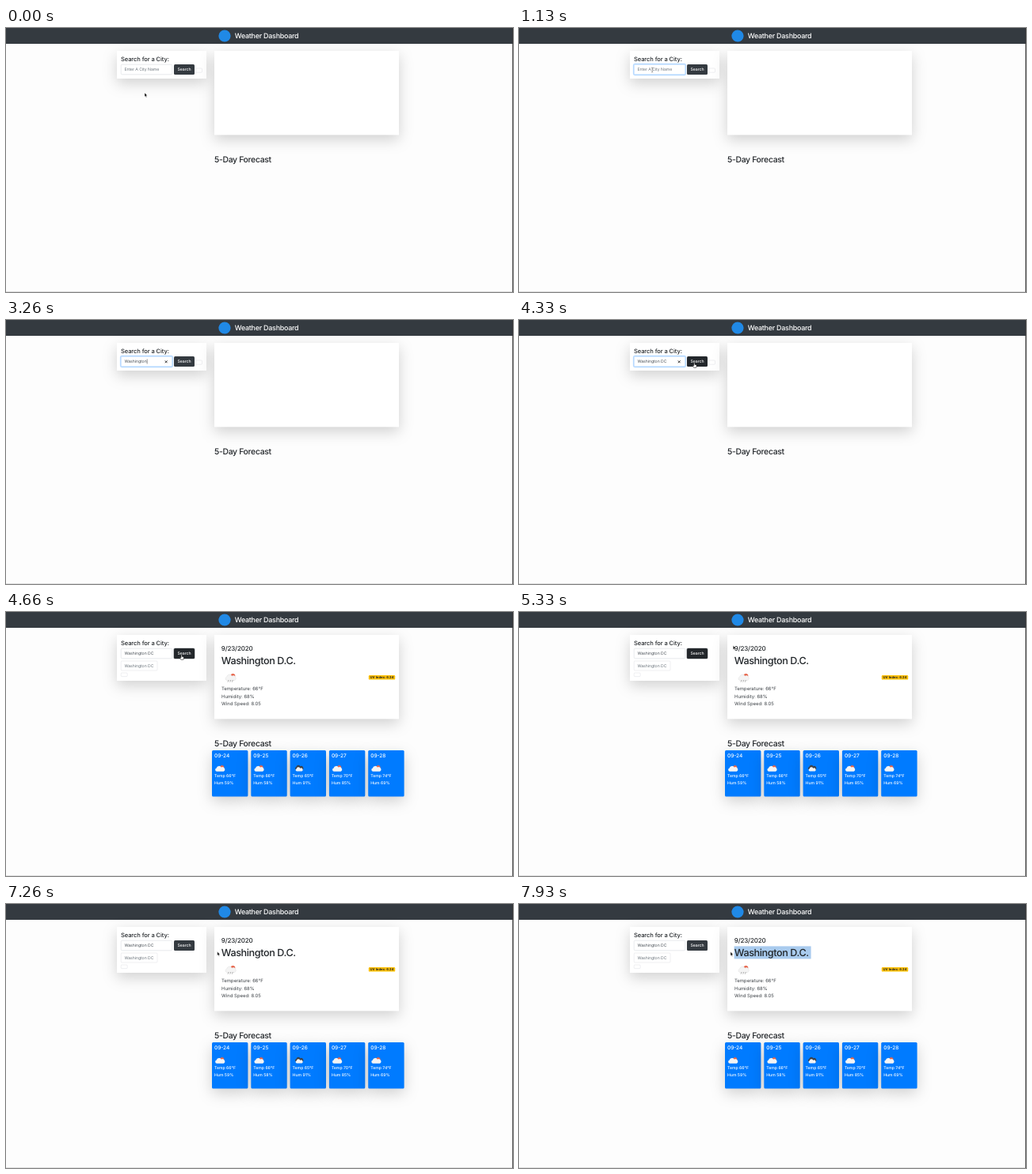
An HTML page that plays this animation: 640 by 334 pixels, repeating every 8 s.

```html
<!DOCTYPE html>
<html lang="en">
<head>
<meta charset="utf-8">
<title>Weather Dashboard</title>
<style>
  html, body { margin: 0; width: 100%; height: 100%; overflow: hidden; background: #fdfdfd; }
  svg { display: block; width: 640px; height: 334px; }
  text { font-family: Inter, "Open Sans", sans-serif; text-rendering: geometricPrecision; white-space: pre; }
  .shadow { filter: drop-shadow(0 6px 9px rgba(0, 0, 0, .175)); }
</style>
</head>
<body>
<svg id="stage" viewBox="0 0 640 334"></svg>
<script>
const LOOP = 8000, FPS = 15;
const INK = '#212529', DARK = '#343a40', BLUE = '#007bff', LINE = '#ced4da';
const stage = document.getElementById('stage');

function add(parent, tag, attrs = {}) {
  const el = document.createElementNS('http://www.w3.org/2000/svg', tag);
  for (const key in attrs) el.setAttribute(key, attrs[key]);
  parent.appendChild(el);
  return el;
}
const group = (parent, attrs) => add(parent, 'g', attrs);
const box = (parent, x, y, width, height, fill, more) =>
  add(parent, 'rect', { x, y, width, height, fill, ...more });
const disc = (parent, cx, cy, r, fill) => add(parent, 'circle', { cx, cy, r, fill });

// Text centred on its capitals at cy; track is letter spacing in em.
function label(parent, str, x, cy, size, { fill = INK, weight = 400, track = 0, anchor = 'start' } = {}) {
  const el = add(parent, 'text', {
    x, y: cy + size * 0.364, fill, 'font-size': size, 'font-weight': weight,
    'letter-spacing': track * size, 'text-anchor': anchor
  });
  el.textContent = str;
  return el;
}
const show = (el, on) => { el.style.visibility = on ? 'visible' : 'hidden'; };

const CLOUD = 'M-4 3.4a2.2 2.2 0 0 1-.4-4.3A3.2 3.2 0 0 1 1.6-1.8A2.7 2.7 0 0 1 4.6 3.4z';
function weatherIcon(parent, x, y, { scale = 1, night = false, rain = false } = {}) {
  const g = group(parent, { transform: `translate(${x} ${y}) scale(${scale})` });
  if (night) add(g, 'path', { d: CLOUD, fill: '#3c4149', transform: 'translate(1 -1.2) scale(.85)' });
  else disc(g, 2.2, -1.5, 2.6, '#e8664b');
  add(g, 'path', {
    d: CLOUD, fill: '#f4f4f4', transform: night ? 'translate(1 1) scale(.75)' : 'translate(-.4 .4)',
    stroke: rain ? '#d5d5d5' : 'none', 'stroke-width': .3
  });
  if (rain) add(g, 'path', { d: 'M-2.6 3.2l-1 2.4M-.2 3.2l-1 2.4M2.2 3.2l-1 2.4', stroke: '#777', 'stroke-width': .5 });
}

// Page frame
box(stage, 0, 0, 640, 334, '#fdfdfd');
box(stage, 0, 333, 640, 1, '#e2e2e2');
box(stage, 0, 0, 640, 20, DARK);
box(stage, 639.2, 0, .8, 334, '#333');
disc(stage, 276, 10, 7.6, '#2089e6');
label(stage, 'Weather Dashboard', 288.7, 9.5, 8.9, { fill: '#fff', weight: 500, track: -.025 });

// Search panel
const panel = box(stage, 140, 29, 113, 35, '#fff', { class: 'shadow' });
label(stage, 'Search for a City:', 145, 39.2, 7.5, { weight: 500, track: -.01 });
const ring = box(stage, 144.4, 45.4, 66.2, 14.2, 'none', { rx: 2, stroke: '#bfdeff', 'stroke-width': 1.1 });
const field = box(stage, 145.2, 46.2, 64.6, 12.6, '#fff', { rx: 1.5, 'stroke-width': .5 });
const small = { track: -.01 };
const hint = label(stage, 'Enter A City Name', 149.5, 52.5, 5.15, { ...small, fill: '#6c757d' });
const typed = label(stage, '', 149.5, 52.5, 5.15, { ...small, fill: '#495057' });
const caret = box(stage, 0, 49.4, .5, 6.2, '#333');
const clear = add(stage, 'path', { d: 'M200.8 51.4l2.8 2.8m0-2.8l-2.8 2.8', stroke: '#222', 'stroke-width': .9 });
const halo = box(stage, 211.4, 45.4, 27.2, 14.2, '#a6a9ac', { rx: 2.2 });
const button = box(stage, 212, 46, 26, 13, DARK, { rx: 1.5 });
label(stage, 'Search', 225, 52.5, 5.15, { fill: '#fff', weight: 500, track: -.01, anchor: 'middle' });

const outline = { rx: 1, stroke: '#dcdfe2', 'stroke-width': .5 };
const emptyItem = box(stage, 239.5, 51, 8, 5.2, '#fff', outline);
const history = group(stage);
box(history, 145.2, 62, 45.8, 12, '#fff', outline);
label(history, 'Washington DC', 149.5, 68, 5.15, { ...small, fill: '#6c757d' });

// Current weather and forecast
box(stage, 263, 29, 233, 106.3, '#fff', { class: 'shadow' });
label(stage, '5-Day Forecast', 263, 166.5, 10.4, { weight: 500, track: -.03 });

const results = group(stage);
const marks = [[271.6, 41, 40.4, 9], [271.6, 53.4, 68, 16], [271.6, 53.4, 97, 16]]
  .map(([x, y, w, h]) => box(results, x, y, w, h, '#a9cbee'));
label(results, '9/23/2020', 271.8, 46, 8, { weight: 500, track: -.02 });
label(results, 'Washington D.C.', 271.8, 61.7, 12.6, { weight: 500, track: -.03 });
weatherIcon(results, 284, 82.5, { scale: 1.1, rain: true });
['Temperature: 66°F', 'Humidity: 68%', 'Wind Speed: 8.05'].forEach((line, i) =>
  label(results, line, 272, 97.2 + i * 9.4, 5.95, { fill: '#3a3f44' }));
box(results, 457.8, 80, 33.4, 5.6, '#ffc107', { rx: 1.2 });
label(results, 'UV Index: 6.24', 474.5, 82.8, 4.15, { weight: 700, anchor: 'middle' });

[['09-24', 66, 59], ['09-25', 66, 58], ['09-26', 65, 91], ['09-27', 70, 85], ['09-28', 74, 69]]
  .forEach(([day, temp, hum], i) => {
    const x = 260 + i * 49.3, white = { fill: '#fff', weight: 500 };
    box(results, x, 175, 45.4, 58.6, BLUE, { rx: 1.5, class: 'shadow' });
    label(results, day, x + 3, 182, 6.5, white);
    weatherIcon(results, x + 10.5, 198, { night: i === 2 });
    label(results, `Temp ${temp}°F`, x + 3, 207.2, 5.15, white);
    label(results, `Hum ${hum}%`, x + 3, 216.3, 5.15, white);
  });

// Pointers, each with its hot spot at 0,0
const pointers = {
  arrow: add(stage, 'path', {
    d: 'M0 0V4.9L1.1 3.9L1.9 5.7L2.7 5.3L1.9 3.6H3.4z',
    fill: '#000', stroke: '#fff', 'stroke-width': .4
  }),
  beam: add(stage, 'path', {
    d: 'M-1-3Q0-3 0-2.4Q0-3 1-3M0-2.4V2.4M-1 3Q0 3 0 2.4Q0 3 1 3',
    fill: 'none', stroke: '#444', 'stroke-width': .5
  }),
  hand: add(stage, 'path', {
    d: 'M-.6 0Q0-.7.6 0V2L2.6 2.6Q3.1 2.8 2.9 3.8L2.4 6H-.7L-2.1 3.7Q-1.8 2.9-.6 3.7z',
    fill: '#fff', stroke: '#000', 'stroke-width': .5
  })
};

// Time, x, y of the pointer
const PATH = [
  [0, 175, 82], [200, 176, 78], [800, 168, 53], [3930, 174, 53], [4060, 178, 53], [4130, 178, 53],
  [4330, 221.3, 54.3], [5000, 222, 54.3], [5270, 270.3, 42.5], [6600, 270.3, 42.5],
  [6930, 259, 54], [7230, 267, 60.5], [LOOP, 267, 60.5]
];
const WORD = 'Washington DC';
const KEYS = [1330, 1730, 1870, 2070, 2200, 2330, 2600, 2800, 3000, 3200, 3400, 3600, 3800];

function pointerAt(t) {
  const i = PATH.findIndex((p, n) => n && t <= p[0]);
  const [t0, x0, y0] = PATH[i - 1], [t1, x1, y1] = PATH[i];
  const u = (t - t0) / (t1 - t0), k = u * u * (3 - 2 * u);
  return [x0 + (x1 - x0) * k, y0 + (y1 - y0) * k];
}

function draw(now) {
  const t = Math.floor((now + 4) * FPS / 1000) * 1000 / FPS + 1;
  const within = (a, b) => t >= a && t < b;

  const focused = within(800, 4460), loaded = t >= 4600;
  const count = KEYS.filter(k => t >= k).length;
  show(ring, focused);
  field.setAttribute('stroke', focused ? '#80bdff' : LINE);
  typed.textContent = WORD.slice(0, count);
  show(hint, !count);
  show(clear, count && t < 4600);
  show(caret, focused && t < 4000 && (count ? true : t % 1060 > 500));
  caret.setAttribute('x', 149.7 + (count ? typed.getComputedTextLength() : 0));

  const pressed = within(4460, 5660);
  show(halo, pressed);
  button.setAttribute('fill', pressed || within(4260, 5130) ? '#23272b' : DARK);

  panel.setAttribute('height', loaded ? 58 : 35);
  emptyItem.setAttribute('x', loaded ? 145.2 : 239.5);
  emptyItem.setAttribute('y', loaded ? 77 : 51);
  emptyItem.setAttribute('height', loaded ? 4.6 : 5.2);
  show(history, loaded);
  results.style.display = loaded ? '' : 'none';
  show(marks[0], within(5860, 6660));
  show(marks[1], within(7660, 7790));
  show(marks[2], t >= 7790);

  const [x, y] = pointerAt(t);
  const inField = x > 145 && x < 210 && y > 46 && y < 59;
  const kind = inField ? 'beam' : within(4200, 5130) ? 'hand' : 'arrow';
  for (const name in pointers) {
    show(pointers[name], name === kind && !within(1330, 4000));
    pointers[name].setAttribute('transform', `translate(${x} ${y})`);
  }
}

const start = performance.now();
function tick() {
  draw((performance.now() - start) % (LOOP - 5));
  requestAnimationFrame(tick);
}
tick();
</script>
</body>
</html>
```
